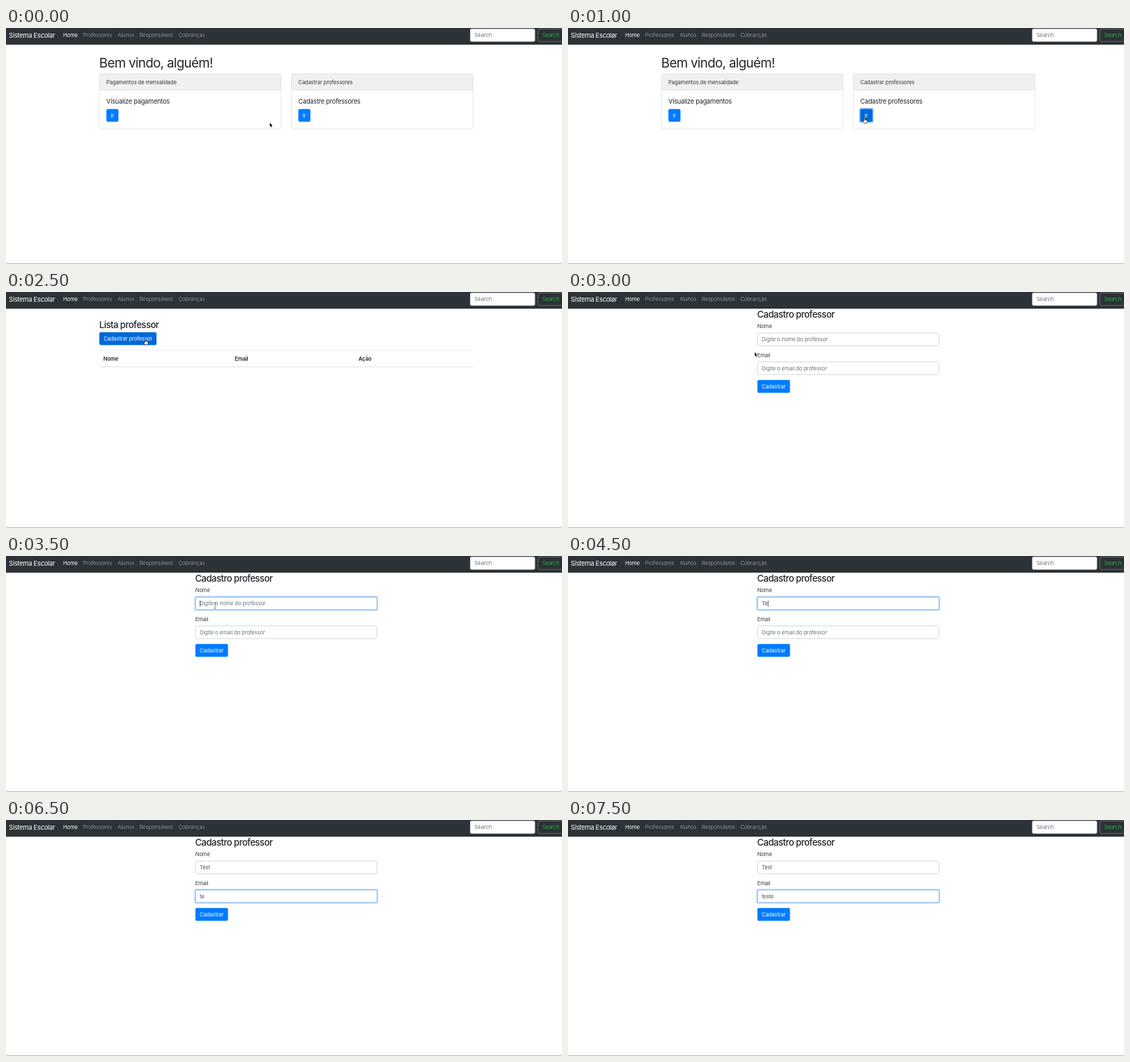
Animation, 798 px wide and 340 px high, one loop 8000 ms. Source, as an HTML page:

```html
<!DOCTYPE html>
<html lang="pt">
<head>
<meta charset="utf-8">
<title>Sistema Escolar</title>
<style>
  html, body { margin: 0; width: 100%; height: 100%; overflow: hidden; background: #fff; }
  svg { display: block; width: 798px; height: 340px; }
  text {
    font: 400 7.55px Inter, Roboto, sans-serif;
    font-optical-sizing: none;
    letter-spacing: -.01em;
    fill: #34383c;
    white-space: pre;
  }
  .h1, .h3, .h5 { fill: #212529; }
  .h1 { font-size: 18.7px; letter-spacing: -.034em; }
  .h3 { font-size: 13.1px; font-weight: 500; letter-spacing: -.04em; }
  .h5 { font-size: 9.2px; letter-spacing: -.023em; }
  .brand { font-size: 9.4px; letter-spacing: -.028em; fill: #fff; }
  .link { fill: #8a8e91; }
  .white { fill: #fff; }
  .green { fill: #28a745; }
  .hint { fill: #6c757d; }
  .typed { fill: #495057; }
  .th { font-weight: 600; fill: #212529; }
</style>
</head>
<body>
<svg id="stage" viewBox="0 0 798 340"></svg>
<script>
const stage = document.getElementById('stage');
const STEP = 500;

function add(parent, tag, attrs = {}, content) {
  const node = document.createElementNS('http://www.w3.org/2000/svg', tag);
  for (const key in attrs) node.setAttribute(key, attrs[key]);
  if (content) node.textContent = content;
  parent.appendChild(node);
  return node;
}
const group = parent => add(parent, 'g');
const text = (parent, x, y, content, cls = '') => add(parent, 'text', { x, y, class: cls }, content);
const box = (parent, x, y, width, height, fill, more = {}) =>
  add(parent, 'rect', { x, y, width, height, fill, ...more });
const show = (node, on) => node.setAttribute('display', on ? 'inline' : 'none');

function button(parent, x, y, width, label) {
  const ring = box(parent, x - 1.5, y - 1.5, width + 3, 21.4, '#80bdff', { rx: 2.6 });
  const face = box(parent, x, y, width, 18.4, '#007bff', { rx: 2 });
  text(parent, x + 6.2, y + 12.1, label, 'white');
  return (hover, focus) => {
    face.setAttribute('fill', hover ? '#0069d9' : '#007bff');
    show(ring, focus);
  };
}

function card(parent, x, header, title) {
  box(parent, x, 65.7, 260.8, 24.2, '#eff0f1', { rx: 1.5 });
  box(parent, x, 89.4, 260.8, .6, '#dcdddd');
  box(parent, x + .2, 65.7, 260.6, 79.3, 'none', { rx: 1.8, stroke: '#d9dadb', 'stroke-width': .6 });
  text(parent, x + 10, 80.6, header);
  text(parent, x + 10, 108.6, title, 'h5');
  return button(parent, x + 10.1, 116.7, 17.3, 'Ir');
}

function field(parent, y, label, placeholder) {
  text(parent, 271.8, y - 6.6, label);
  const ring = box(parent, 270.3, y - 1.5, 263.9, 21.5, '#bfdeff', { rx: 2.8 });
  box(parent, 272, y + .2, 260.5, 18.1, '#fff', { rx: 1.8, stroke: '#c3c8cd', 'stroke-width': .7 });
  const edge = box(parent, 272, y + .2, 260.5, 18.1, 'none', { rx: 1.8, stroke: '#70b4ff', 'stroke-width': .8 });
  const hint = text(parent, 278, y + 12.3, placeholder, 'hint');
  const typed = text(parent, 278, y + 12.3, '', 'typed');
  const caret = box(parent, 278, y + 5, .7, 9, '#222');
  return (value, focus, caretOn) => {
    ring.setAttribute('opacity', focus);
    edge.setAttribute('opacity', focus);
    show(hint, !value);
    typed.textContent = value;
    show(caret, caretOn);
    caret.setAttribute('x', 278 + (value ? typed.getComputedTextLength() + .3 : 0));
  };
}

// Navigation bar
box(stage, 0, 0, 798, 340, '#fff');
box(stage, 0, 0, 798, 24, '#2d3237');
text(stage, 3.9, 13.8, 'Sistema Escolar', 'brand');
text(stage, 82, 13.3, 'Home', 'white');
[[110.7, 'Professores'], [160.2, 'Alunos'], [191.7, 'Responsáveis'], [247.4, 'Cobranças']]
  .forEach(([x, label]) => text(stage, x, 13.3, label, 'link'));
box(stage, 666.3, 1.2, 92.8, 18.3, '#fff', { rx: 2, stroke: '#ced4da', 'stroke-width': .5 });
text(stage, 672.5, 13.3, 'Search', 'hint');
box(stage, 763.5, 1.5, 37, 17.8, 'none', { rx: 2, stroke: '#66806f', 'stroke-width': .7 });
text(stage, 769.8, 13.3, 'Search', 'green');
box(stage, 0, 339, 798, 1, '#bdbdbd');

// Pages
const pages = { home: group(stage), list: group(stage), form: group(stage) };

text(pages.home, 133.8, 57, 'Bem vindo, alguém!', 'h1');
card(pages.home, 134, 'Pagamentos de mensalidade', 'Visualize pagamentos')(false, false);
const goButton = card(pages.home, 409.5, 'Cadastrar professores', 'Cadastre professores');

text(pages.list, 133.8, 51.7, 'Lista professor', 'h3');
const newButton = button(pages.list, 134, 58, 82, 'Cadastrar professor');
box(pages.list, 134, 83.7, 536.6, .6, '#dee2e6');
box(pages.list, 134, 107.4, 536.6, 1, '#dee2e6');
[[139.8, 'Nome'], [328.2, 'Email'], [506, 'Ação']]
  .forEach(([x, label]) => text(pages.list, x, 99, label, 'th'));

text(pages.form, 271.5, 37.2, 'Cadastro professor', 'h3');
const nameField = field(pages.form, 59, 'Nome', 'Digite o nome do professor');
const mailField = field(pages.form, 100.6, 'Email', 'Digite o email do professor');
button(pages.form, 271.8, 126.8, 46.8, 'Cadastrar')(false, false);

// Pointers, each drawn with its hot spot at 0,0
const pointer = (d, attrs) => add(stage, 'path', { d, 'stroke-linejoin': 'round', ...attrs });
const outlined = { fill: '#000', stroke: '#fff', 'stroke-width': .7, 'paint-order': 'stroke' };
const pointers = {
  arrow: pointer('M0 0V5.7L1.2 4.6 2.1 6.8 3 6.4 2.1 4.2H3.8Z', outlined),
  hand: pointer('M-.7 .6Q0-.5.7.6V3L3.5 3.6Q4.3 3.9 4.1 5L3.4 8H-.4L-2.6 5Q-2.6 4-1.7 4.3L-.7 5Z',
    { fill: '#fff', stroke: '#111', 'stroke-width': .7 }),
  beam: pointer('M-1.3-4.5Q0-4.5 0-3.5V3.5Q0 4.5-1.3 4.5M1.3-4.5Q0-4.5 0-3.5M0 3.5Q0 4.5 1.3 4.5',
    { fill: 'none', stroke: '#333', 'stroke-width': .6 })
};

const idle = ['', 0, false];
const named = ['Test', 0, false];
const steps = [
  { page: 'home', at: ['arrow', 378.7, 136.5] },
  { page: 'home', at: ['hand', 427, 134], hover: true },
  { page: 'home', at: ['hand', 425.4, 129.2], hover: true, focus: true },
  { page: 'list', at: ['arrow', 428.2, 125.7] },
  { page: 'list', at: ['arrow', 223.8, 93.8] },
  { page: 'list', at: ['hand', 200, 68], hover: true },
  { page: 'form', at: ['arrow', 268, 86.7] },
  { page: 'form', at: ['beam', 300, 71.3], name: ['', 1, true] },
  { page: 'form', at: ['beam', 300, 71.3], name: ['', 1, false] },
  { page: 'form', name: ['Te', 1, true] },
  { page: 'form', name: ['Test', 1, true] },
  { page: 'form', name: ['Test', .5, false], mail: ['', .5, false] },
  { page: 'form', name: named, mail: ['', 1, false] },
  { page: 'form', name: named, mail: ['te', 1, false] },
  { page: 'form', name: named, mail: ['testes', 1, true] },
  { page: 'form', name: named, mail: ['teste', 1, false] }
];

function render(time) {
  const { page, at = [], hover = false, focus = false, name = idle, mail = idle } =
    steps[Math.floor(time / STEP) % steps.length];
  for (const key in pages) show(pages[key], key === page);
  goButton(hover, focus);
  newButton(hover, focus);
  nameField(...name);
  mailField(...mail);
  const [kind, x, y] = at;
  for (const key in pointers) show(pointers[key], key === kind);
  if (kind) pointers[kind].setAttribute('transform', `translate(${x} ${y})`);
}

const start = performance.now();
function tick() {
  render(performance.now() - start);
  requestAnimationFrame(tick);
}
tick();
</script>
</body>
</html>
```
